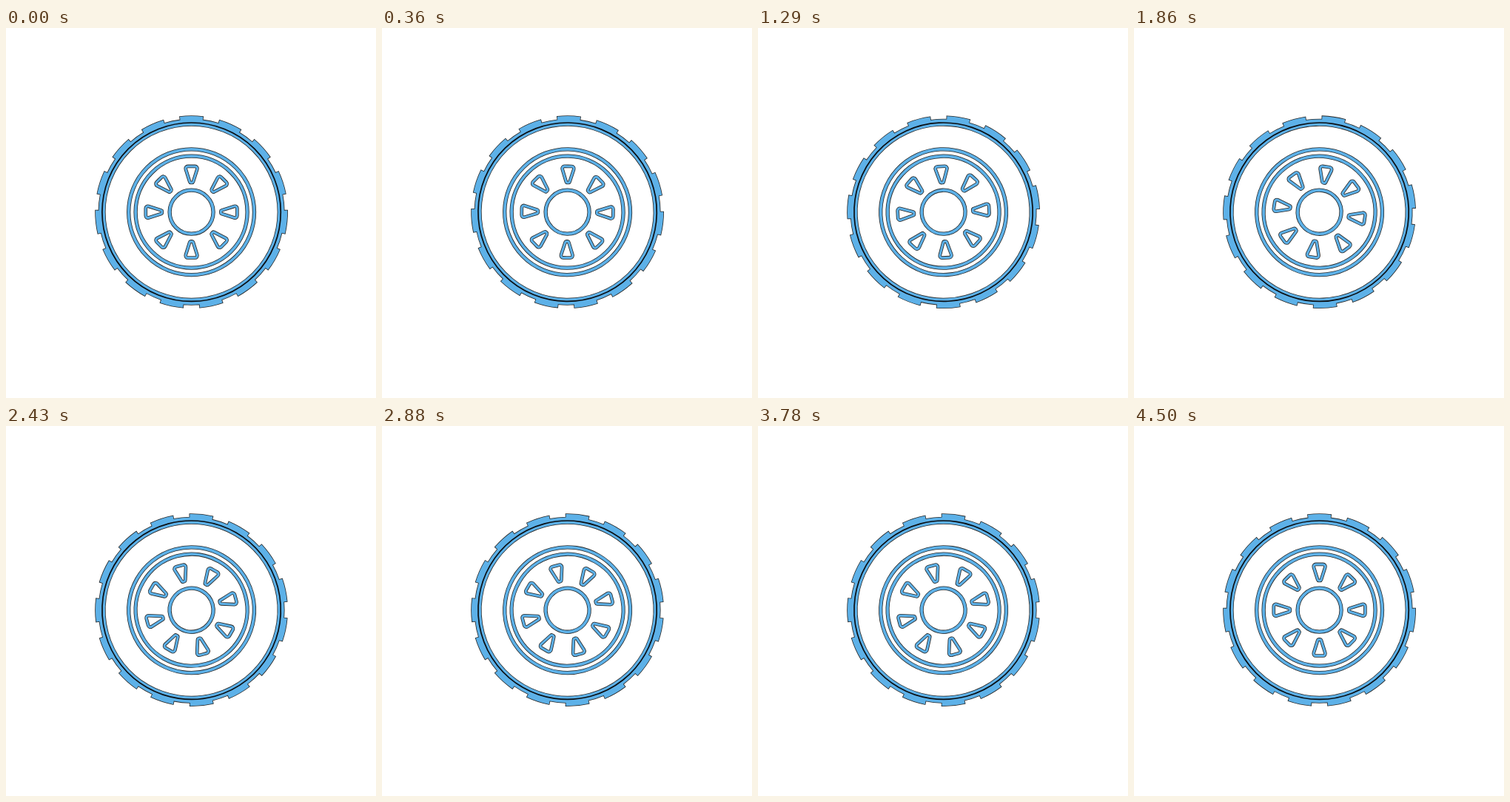
An HTML page with a canvas for the animation above (9030 ms loop, 500 by 500 pixels).

```html
<!DOCTYPE html>
<html lang="en">
<head>
<meta charset="utf-8">
<title>Wheel</title>
<style>
html, body { margin: 0; width: 100%; height: 100%; overflow: hidden; background: #fff; }
canvas { display: block; width: 100vw; height: 100vh; }
</style>
</head>
<body>
<canvas id="stage" width="500" height="500"></canvas>
<script>
const ctx = document.getElementById('stage').getContext('2d');
const BLUE = '#5db1e8', EDGE = 'rgba(0,0,0,.85)', TAU = Math.PI * 2;
const LOOP = 9030, STEP = 30, SPIN = 2640, BACK = 3780, REST = 4500;
const OVER = 30, TURN = 360 + OVER;
const TREADS = 15, HOLES = 8;

const easeInOut = (u, p) =>
  u < .5 ? Math.pow(2 * u, p) / 2 : 1 - Math.pow(2 - 2 * u, p) / 2;

// One turn with an overshoot, a pause, then a roll back to rest.
function angleAt(t) {
  if (t >= REST) return 0;
  if (t < SPIN) return TURN * easeInOut(t / SPIN, 4.2);
  if (t < BACK) return TURN;
  return TURN - OVER * easeInOut((t - BACK) / (REST - BACK), 2);
}

function circle(r) {
  const path = new Path2D();
  path.arc(0, 0, r, 0, TAU);
  return path;
}

function treadRing(base, top, inner, half) {
  const path = new Path2D();
  const pitch = TAU / TREADS;
  for (let i = 0; i < TREADS; i++) {
    const mid = i * pitch - Math.PI / 2;
    path.arc(0, 0, top, mid - half, mid + half);
    path.arc(0, 0, base, mid + half, mid + pitch - half);
  }
  path.closePath();
  path.moveTo(inner, 0);
  path.arc(0, 0, inner, 0, TAU, true);
  return path;
}

function hole() {
  const path = new Path2D();
  path.moveTo(0, -61.8);
  path.arcTo(9, -61.8, 2, -39.7, 3);
  path.arcTo(2, -39.7, -2, -39.7, 1.6);
  path.arcTo(-2, -39.7, -9, -61.8, 1.6);
  path.arcTo(-9, -61.8, 0, -61.8, 3);
  path.closePath();
  return path;
}

const tyre = treadRing(125.2, 129.6, 116.8, .121);
const seam = circle(120.7);
const rings = [circle(84.9), circle(75.5), circle(29.5)];
const slot = hole();

function stroke(path, color, width) {
  ctx.strokeStyle = color;
  ctx.lineWidth = width;
  ctx.stroke(path);
}

function outline(path, width) {
  stroke(path, EDGE, width + 1.6);
  stroke(path, BLUE, width);
}

function draw(deg) {
  ctx.setTransform(1, 0, 0, 1, 0, 0);
  ctx.fillStyle = '#fff';
  ctx.fillRect(0, 0, 500, 500);
  ctx.translate(250.6, 248.7);
  ctx.rotate(deg * Math.PI / 180);

  stroke(tyre, EDGE, 1.6);
  ctx.fillStyle = BLUE;
  ctx.fill(tyre, 'evenodd');
  stroke(seam, '#0a0f14', 1.7);

  for (const ring of rings) outline(ring, 3.7);
  for (let i = 0; i < HOLES; i++) {
    outline(slot, 3);
    ctx.rotate(TAU / HOLES);
  }
}

const start = performance.now();
function frame() {
  const t = (performance.now() - start) % LOOP;
  draw(angleAt(Math.floor(t / STEP) * STEP));
  requestAnimationFrame(frame);
}
frame();
</script>
</body>
</html>
```
